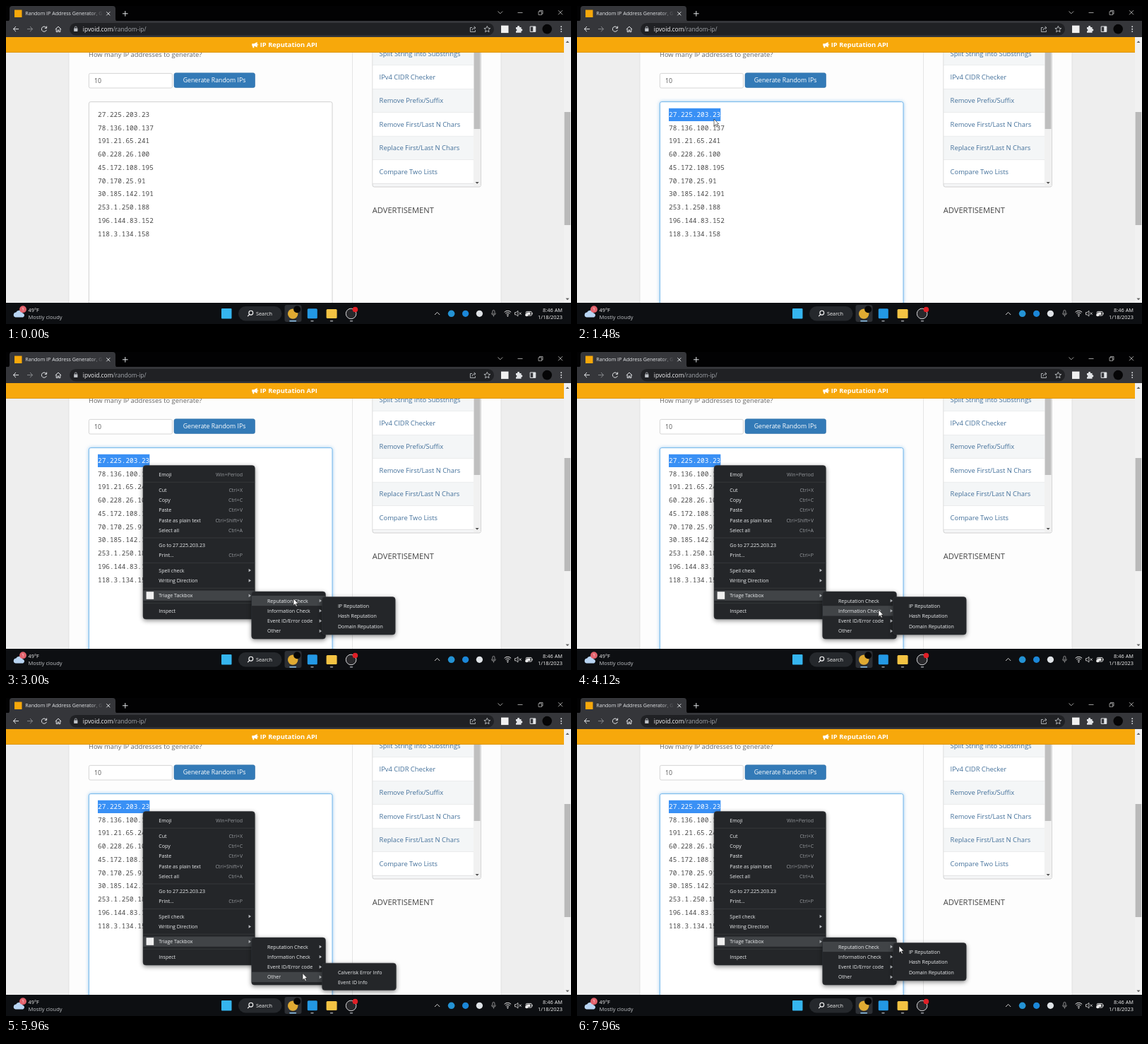
Write an HTML page that moves like this. It is 800 by 450 pixels and loops after 8000 ms.

```html
<!DOCTYPE html>
<html lang="en">
<head>
<meta charset="utf-8">
<title>Context menu demo</title>
<style>
html, body { margin: 0; width: 100%; height: 100%; overflow: hidden; background: #000; }
svg { display: block; width: 100%; height: 100%; }
text { font-family: "Open Sans", "Noto Sans", sans-serif; white-space: pre; }
.mono { font-family: "Noto Sans Mono", "DejaVu Sans Mono", monospace; }
.menu { filter: drop-shadow(0 2px 3px rgba(0, 0, 0, .45)); }
</style>
</head>
<body>
<svg id="stage" viewBox="0 0 800 450" xmlns="http://www.w3.org/2000/svg"></svg>
<script>
const LOOP = 8000;
const stage = document.getElementById('stage');

// Markup helpers; text is placed by the middle of its capitals.
const rect = (x, y, w, h, fill, more = '') =>
  `<rect x="${x}" y="${y}" width="${w}" height="${h}" fill="${fill}" ${more}/>`;
const dot = (x, y, r, fill, more = '') =>
  `<circle cx="${x}" cy="${y}" r="${r}" fill="${fill}" ${more}/>`;
const text = (x, mid, s, size, fill, more = '') =>
  `<text x="${x}" y="${mid + size * .357}" font-size="${size}" fill="${fill}" ${more}>${s}</text>`;
const line = (d, color, w = 1, more = '') =>
  `<path d="${d}" fill="none" stroke="${color}" stroke-width="${w}" ${more}/>`;
const shape = (d, fill, more = '') => `<path d="${d}" fill="${fill}" ${more}/>`;
const END = 'text-anchor="end"';

const ips = ['27.225.203.23', '78.136.100.137', '191.21.65.241', '60.228.26.100',
  '45.172.108.195', '70.170.25.91', '30.185.142.191', '253.1.250.188',
  '196.144.83.152', '118.3.134.158'];
const links = ['Split String Into Substrings', 'IPv4 CIDR Checker', 'Remove Prefix/Suffix',
  'Remove First/Last N Chars', 'Replace First/Last N Chars', 'Compare Two Lists'];
const CHAR = 5.64;

function page() {
  let s = rect(0, 44, 800, 376, '#eeeeee') +
    rect(89, 40, 612, 400, '#fdfdfd', 'stroke="#dddddd" stroke-width=".8"') +
    line('M490.5 66V420', '#dddddd', .8) +
    text(117, 68.5, 'How many IP addresses to generate?', 9.37, '#666') +
    rect(117.4, 95.4, 118, 20.6, '#fff', 'rx="2" stroke="#ccc" stroke-width=".8"') +
    text(125, 105.7, '10', 8.75, '#555') +
    rect(238, 94.8, 114.5, 20.6, '#337ab7', 'rx="2.5" stroke="#2e6da4" stroke-width=".6"') +
    text(250.7, 105, 'Generate Random IPs', 8.75, '#fff') +
    rect(117.4, 135.6, 344.6, 300, '#fff', 'id="area" rx="2.5" stroke="#ccc" stroke-width=".9"');
  ips.forEach((ip, i) => {
    s += text(130, 153.6 + i * 18.75, ip, 9.4, '#484848', 'class="mono"');
  });
  s += `<clipPath id="selClip">${rect(130, 144.5, 0, 18.5, '#000', 'id="selBox"')}</clipPath>
    <g clip-path="url(#selClip)">${rect(130, 144.5, 80, 18.5, '#3990f5')}
    ${text(130, 153.6, ips[0], 9.4, '#fff', 'class="mono"')}</g>`;

  s += rect(519, 50, 153.4, 206, '#f5f6f7', 'rx="2.5" stroke="#ccc" stroke-width=".9"');
  links.forEach((name, i) => {
    const y = 50.6 + i * 33.45;
    s += rect(519.4, y, 142.4, 33.45, i % 2 ? '#fff' : '#f4f6f7') +
      line(`M519 ${y + 33.45}H662`, '#ddd', .8) +
      text(528.6, y + 16.6, name, 9.37, '#44719b');
  });
  return s + rect(662, 60, 10, 195, '#f1f1f1') + rect(662.6, 60, 8.8, 114, '#bfbfbf') +
    shape('M664.6 249h5l-2.5 2.8z', '#505050') +
    text(518.7, 289, 'ADVERTISEMENT', 11.15, '#444') +
    rect(790, 44, 10, 376, '#f1f1f1') + rect(790.6, 150, 8.6, 160, '#b9b9b9') +
    shape('M792.5 52h5l-2.5-2.8zM792.5 413.5h5l-2.5 2.8z', '#606060') +
    rect(0, 44, 790, 21.8, '#f7a80b') + rect(0, 65, 790, .9, '#d99310') +
    shape('M348.3 53.2h3l4.4-2.2v7.6l-4.4-2.1v2.8h-1.7l-.6-2.8h-.7zM356.3 53.6a1.3 1.3 0 0 1 0 2.5z', '#fff') +
    text(359.8, 55.1, 'IP Reputation API', 9.3, '#fff', 'font-weight="700"');
}

function browser() {
  const ink = '#e2e4e7';
  return rect(0, 0, 800, 22, '#020203') +
    shape('M1 22Q5 22 5 18V4Q5 0 9 0H151Q155 0 155 4V18Q155 22 159 22z', '#35363a') +
    rect(0, 21, 800, 23, '#35363a') +
    rect(12, 5.5, 10.5, 10.5, '#f7a80b') +
    text(27.3, 10.7, 'Random IP Address Generator, G', 7.12, '#e4e6e9') +
    rect(118, 4, 20, 14, 'url(#fade)') +
    line('M142.3 8.3l5 5m0-5l-5 5M165 10.8h7.6M168.8 7v7.6', ink, 1) +
    line('M696.5 7.5l3.3 3.3 3.3-3.3M724.5 9.4h7M782 6.2l6 6m0-6l-6 6', '#ccc', .8) +
    line('M754 7.8h4.6v4.6H754zM755.4 7.8V6.4H760v4.6h-1.4', '#ccc', .7) +
    rect(90, 24, 601, 17.6, '#202124', 'rx="8.8"') +
    line('M18 32.6h-7.5m3.5-3.6l-3.6 3.6 3.6 3.6', ink, 1) +
    line('M30 32.6h7.5m-3.5-3.6l3.6 3.6-3.6 3.6', '#85878b', 1) +
    line('M57.2 31a3.6 3.6 0 1 0 .2 2.8M57.6 28.6v2.8h-2.8', ink, 1) +
    line('M69.8 33l4.2-3.9 4.2 3.9M71.2 32.2v4.4h2v-2.6h1.6v2.6h2v-4.4', ink, 1) +
    rect(96.2, 31.6, 5.2, 4.4, '#bdc1c6', 'rx=".6"') +
    line('M97.3 31.8v-1.3a1.5 1.5 0 0 1 3 0v1.3', '#bdc1c6', .8) +
    text(108.8, 32.9, 'ipvoid.com<tspan fill="#a4a8ad">/random-ip/</tspan>', 8.38, '#f0f1f3') +
    line('M660 30.5h-2.6v6h7v-2.4M660 34.5q.3-3.7 4.7-3.7m-2-2l2.2 2-2.2 2', '#cfd2d6', .8) +
    line('M681.3 28.4l1.3 2.9 3.1.3-2.4 2.1.7 3.1-2.7-1.6-2.7 1.6.7-3.1-2.4-2.1 3.1-.3z', '#cfd2d6', .8) +
    rect(701, 27.6, 10.5, 10.5, '#f0f0f0') +
    shape('M722 30h2.2a1.5 1.5 0 1 1 2.8 0h2.5v2.6a1.4 1.4 0 1 1 0 2.7v2.4H722v-2.2a1.4 1.4 0 0 0 0-2.8z', ink) +
    line('M742.2 29h7.6v7.4h-7.6z', ink, 1) + rect(746.2, 29, 3.6, 7.4, ink) +
    dot(766.2, 32.6, 6.8, '#050506') +
    [29.3, 32.7, 36.1].map(y => dot(786.2, y, .95, ink)).join('');
}

function taskbar() {
  const run = [433.5, 461, 489].map(x => rect(x - 2.2, 445, 4.4, 1.4, '#999ca1', 'rx=".7"')).join('');
  return rect(0, 420, 800, 30, '#0d0f12') +
    shape('M13.5 440.5a3.6 3.6 0 0 1 .6-7.1 5 5 0 0 1 9.3 1 3.2 3.2 0 0 1 .7 6.1z', '#b8d4f2') +
    dot(24, 429.2, 4.9, '#e2626c') + text(24, 429.3, '1', 6, '#fff', 'text-anchor="middle"') +
    text(31.6, 430, '49°F', 7.3, '#f4f4f4') + text(31.4, 440, 'Mostly cloudy', 7.5, '#c4c7cb') +
    rect(305, 428, 14.5, 14.5, '#35b5ef', 'rx="1"') +
    rect(329, 425, 61.5, 20.5, '#25282c', 'rx="10.2"') +
    dot(346.8, 434.2, 2.9, 'none', 'stroke="#fff" stroke-width="1.1"') +
    line('M344.8 436.4l-2.6 2.7', '#fff', 1.2) +
    text(354, 435.3, 'Search', 7.3, '#f2f2f2') +
    rect(394.5, 423, 24, 24, '#2c2f34', 'rx="3"') +
    dot(406.2, 435.6, 7.2, '#e0aa32') + dot(412.2, 429.3, 5, '#050506') +
    rect(401.2, 445, 10, 1.5, '#8ec5ee', 'rx=".7"') +
    rect(426.8, 428.3, 14, 14, '#2398e4', 'rx="1.5"') +
    rect(453.6, 429, 15, 13, '#f4c343', 'rx="1.5"') +
    dot(488.6, 435.4, 7.3, '#28282b', 'stroke="#d8d8da" stroke-width="1"') +
    dot(494.4, 429.5, 3.8, '#e01f26') + run +
    line('M607 437l3.6-3.6 3.6 3.6', '#e4e4e4', .9) +
    dot(630.6, 435.3, 4.8, '#2493d4') + dot(650.6, 435.3, 4.6, '#1b87d8') + dot(670.4, 435.3, 4.6, '#dfe3e7') +
    rect(688.9, 430.4, 3, 5.6, 'none', 'rx="1.5" stroke="#aaa" stroke-width=".8"') +
    line('M687.5 434.5a2.9 2.9 0 0 0 5.8 0M690.4 437.6v2', '#aaa', .8) +
    line('M705.7 433.3a6.6 6.6 0 0 1 9.4 0M707.3 435.2a4.4 4.4 0 0 1 6.2 0M708.8 437a2.3 2.3 0 0 1 3.2 0', '#eee', 1) +
    dot(710.4, 438.6, .9, '#eee') +
    line('M720.5 433.6h1.8l2.6-2.2v7.6l-2.6-2.2h-1.8zM726.7 433.6l3 3.2m0-3.2l-3 3.2', '#e4e4e4', .8) +
    rect(736.3, 432.4, 8, 5.6, 'none', 'rx="1" stroke="#eee" stroke-width=".9"') +
    rect(737.4, 433.5, 5, 3.4, '#eee') + line('M745 434v2.4', '#eee', 1) + dot(737.2, 437.3, 2, '#eee') +
    text(788, 430, '8:46 AM', 7.4, '#f2f2f2', END) + text(788, 440, '1/18/2023', 7.4, '#f2f2f2', END);
}

// Each item: [label, middle y, shortcut or '>' for a submenu]
const mainItems = [['Emoji', 173.5, 'Win+Period'], ['Cut', 195, 'Ctrl+X'], ['Copy', 209.3, 'Ctrl+C'],
  ['Paste', 223.6, 'Ctrl+V'], ['Paste as plain text', 238, 'Ctrl+Shift+V'], ['Select all', 252.3, 'Ctrl+A'],
  ['Go to ' + ips[0], 273.5], ['Print...', 287.8, 'Ctrl+P'], ['Spell check', 309, '&gt;'],
  ['Writing Direction', 323.5, '&gt;'], ['Triage Tackbox', 344.7, '&gt;'], ['Inspect', 366]];
const subItems = ['Reputation Check', 'Information Check', 'Event ID/Error code', 'Other']
  .map((s, i) => [s, 352 + i * 14.3, '&gt;']);
const repItems = ['IP', 'Hash', 'Domain'].map((s, i) => [s + ' Reputation', 359.4 + i * 14.3]);
const eventItems = [['Calverisk Error Info', 388], ['Event ID Info', 402.3]];

function menu(id, x, y, w, h, items, extra = '') {
  const rows = items.map(([label, mid, key]) =>
    text(x + 22.3, mid, label, 7.05, '#eceef0') + (!key ? '' : key === '&gt;'
      ? shape(`M${x + w - 8.8} ${mid - 2.3}v4.6l3.4-2.3z`, '#b9bcc0')
      : text(x + w - 17.3, mid, key, 7.05, '#95989c', END))).join('');
  return `<g id="${id}" class="menu">${rect(x, y, w, h, '#242629', 'rx="4" stroke="#37393c" stroke-width=".5"')}
    ${rect(x + .3, 0, w - .6, 14.3, '#414447', `id="${id}Hover"`)}${rows}${extra}</g>`;
}

const rules = [184.2, 263, 298.4, 334.2, 355.3]
  .map(y => line(`M194 ${y}H352.4`, '#3d4043', .7)).join('');

stage.innerHTML = `<defs><linearGradient id="fade"><stop stop-color="#35363a" stop-opacity="0"/>
  <stop offset="1" stop-color="#35363a"/></linearGradient></defs>` +
  page() + browser() + taskbar() +
  menu('main', 194, 160.6, 158.4, 217.4, mainItems, rules + rect(198.6, 339.2, 10.6, 10.6, '#f0f0f0')) +
  menu('sub', 347.7, 339, 104.8, 67, subItems) +
  menu('rep', 447.6, 346.6, 103.6, 53.4, repItems) +
  menu('event', 447.6, 375.2, 104.8, 38.4, eventItems) +
  shape('M0 0V9.7L2.2 7.6 3.8 11.1 5.4 10.4 3.8 7H6.8z', '#fff',
    'id="cursor" stroke="#111" stroke-width=".6"');

const el = id => document.getElementById(id);
const show = (id, on) => el(id).setAttribute('visibility', on ? 'visible' : 'hidden');

// Pointer stops: time, x, y
const stops = [[1240, 194, 160], [1640, 194, 160], [1960, 245, 331], [2160, 262, 344],
  [2420, 340, 344.5], [2780, 407, 349], [3500, 407, 349], [4120, 427, 365], [4420, 424, 380],
  [5500, 424, 381], [5960, 420, 389.5], [6150, 420, 391], [6600, 412, 353], [7300, 418, 352],
  [7940, 456, 351]];

function pointer(t) {
  const i = stops.findIndex(s => s[0] > t);
  if (i === 0) return stops[0].slice(1);
  if (i < 0) return stops[stops.length - 1].slice(1);
  const [t0, x0, y0] = stops[i - 1], [t1, x1, y1] = stops[i];
  const p = (t - t0) / (t1 - t0), e = p * p * (3 - 2 * p);
  return [x0 + (x1 - x0) * e, y0 + (y1 - y0) * e];
}

function hover(id, items, y) {
  const item = items.find(it => Math.abs(it[1] - y) < 7.15);
  show(id + 'Hover', item && el(id).getAttribute('visibility') === 'visible');
  if (item) el(id + 'Hover').setAttribute('y', item[1] - 7.15);
}

function draw(t) {
  const focus = t >= 760;
  el('area').setAttribute('stroke', focus ? '#66afe9' : '#ccc');
  el('area').style.filter = focus ? 'drop-shadow(0 0 2.5px rgba(102,175,233,.65))' : 'none';
  const chars = Math.max(0, Math.min(13, Math.floor((t - 800) / 30)));
  el('selBox').setAttribute('width', chars * CHAR);

  const [x, y] = pointer(t);
  show('cursor', t >= 1240);
  el('cursor').setAttribute('transform', `translate(${x} ${y})`);

  const subOpen = t >= 2400;
  show('main', t >= 1640);
  show('sub', subOpen);
  show('rep', (t >= 2860 && t < 4720) || t >= 6880);
  show('event', t >= 4720 && t < 6880);
  hover('main', mainItems, subOpen ? 344.7 : y);
  hover('sub', subItems, x > 348 ? y : 0);
  show('repHover', false);
  show('eventHover', false);
}

const start = performance.now();
function tick() {
  draw((performance.now() - start) % LOOP);
  requestAnimationFrame(tick);
}
tick();
</script>
</body>
</html>
```
